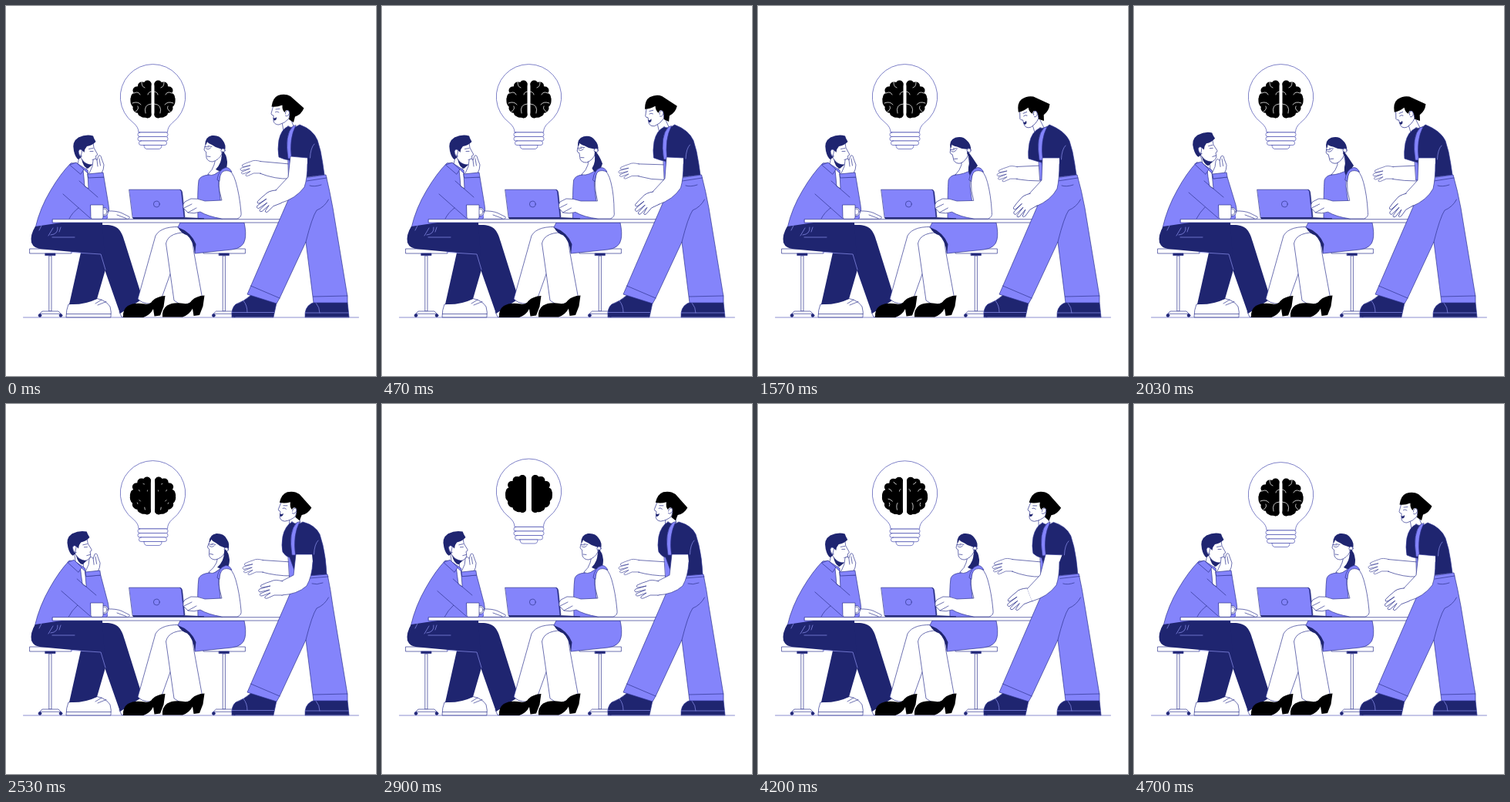
An HTML page for the animation above (4.8 s loop, 480 by 480 pixels).

```html
<!DOCTYPE html>
<html lang="en">
<head>
<meta charset="utf-8">
<title>Team idea</title>
<style>
html,body{margin:0;width:100%;height:100%;overflow:hidden;background:#fff}
svg{display:block;width:100vw;height:100vh}
svg *{stroke-linejoin:round;stroke-linecap:round}
.w{fill:#fff}.p{fill:#8484fb}.n{fill:#1f2570}.k{fill:#000}
.l{fill:none}
.pale{fill:none;stroke:#8f92f0}
.none{stroke:none}
.curl{fill:none;stroke:#fff;stroke-width:.75;stroke-linecap:butt}
</style>
</head>
<body>
<svg viewBox="0 0 480 480" stroke="#2f3490" stroke-width=".7">
<defs>
  <g id="stool">
    <rect class="w" x="31" y="315" width="54" height="6"/>
    <rect class="n" x="51" y="321" width="13" height="2.6"/>
    <rect class="w" x="56.2" y="324" width="2.8" height="72"/>
    <path class="w" d="M44 399L47 396H68L71 399Z"/>
    <circle class="n" cx="44" cy="401.4" r="2"/><circle class="n" cx="71" cy="401.4" r="2"/>
  </g>
  <path id="heel" class="k none" d="M152 404Q151 394 158 389Q166 384 180 386.500Q186 388 190 382.500Q196 376.500 206.500 376L204.500 390L200 401.500L192.500 402.500L191 393Q187 401 178 404Z"/>
  <g id="hand">
    <path class="w" d="M2-9Q-8-12-13-9Q-20-7-26-4Q-28-1-24-1L-14-3L-28 1Q-31 3-28 5L-15 2L-27 7Q-29 10-25 10L-14 6L-21 11Q-22 14-18 13L-9 9H2"/>
  </g>
  <g id="half">
    <path class="k none" d="M188.500 100V142Q186 147 181 144.500Q175 146 172 139Q165 139 165 131Q160 127 162 119Q162 114 166 113Q165 105 172 104Q173 98 180 99Q185 94 188.500 100Z"/>
    <g class="k none">
      <circle cx="183.500" cy="101.500" r="5"/><circle cx="176" cy="103.500" r="5"/><circle cx="169.500" cy="109.500" r="5"/>
      <circle cx="166.500" cy="120.500" r="5"/><circle cx="169.500" cy="132.500" r="5"/><circle cx="176" cy="138.500" r="5"/><circle cx="183.500" cy="140.500" r="5"/>
    </g>
    <g class="curl">
      <path pathLength="1" d="M180 106Q176 105 176 99"/>
      <path pathLength="1" d="M174 115Q172 110 166 113"/>
      <path pathLength="1" d="M184 115Q184 112 188.500 111"/>
      <path pathLength="1" d="M175 128Q171 123 164 126"/>
      <path pathLength="1" d="M171 130Q173 134 168 137"/>
      <path pathLength="1" d="M181 139Q178 128 188.500 127"/>
    </g>
  </g>
</defs>
<rect class="w none" width="480" height="480"/>
<path d="M22.500 404H457.500" stroke="#5c60bd"/>

<g id="bulb" stroke="#484db0">
  <path class="w" d="M172 163.500Q172 157 165 151.400A42.200 42.200 0 1 1 216 151.400Q209.500 157 209.500 163.500Z"/>
  <rect class="w" x="171" y="164" width="39" height="5.500" rx="2.500"/>
  <rect class="w" x="171" y="169.500" width="39" height="5.500" rx="2.500"/>
  <rect class="w" x="172.500" y="175" width="36" height="5.500" rx="2.500"/>
  <path class="w" d="M179 180.500H202Q202 185.500 198 185.500H183Q179 185.500 179 180.500Z"/>
  <use id="brainL" href="#half"/>
  <use id="brainR" href="#half"/>
</g>

<use href="#stool"/>
<use href="#stool" x="225.400"/>

<!-- seated man -->
<path class="w" d="M147 397L150 403.500H160L162 390Z"/>
<path class="n none" d="M118 284H132C146 285 150 292 154 306L175 373L174 382L148 399L121 322Z"/>
<path class="w" d="M78 403.500Q78 394 81 387Q100 386 118 379.500Q130 382 135 390Q137 397 136 403.500Z"/>
<path class="l" d="M78.500 399.500H136M116 386L124 381M119 388L130 383.500"/>
<path id="mNeck" class="w"/>
<path id="mTorso" class="p"/>
<path class="n none" d="M38 286L72 281L125 281L129 342L118 380Q102 388 82 387L97 320L48 315.500Q36 315 33 307Q31 297 38 286Z"/>
<path class="pale" d="M84 319.500L123 322L129 342M55 298L61 288M58 297Q68 296 67 287M71 287L69 293M60 300H89M43 291L46 285"/>
<path id="mTie" class="w"/>
<path id="mCollar" class="p"/>
<path id="mFold" class="l"/>
<g id="mHead">
  <path class="w" d="M101 179L113 177L114 184L118.500 192Q119 194 116.500 194.500L117 200Q115 206 109 206Q102 205 97 197Z"/>
  <path class="n none" d="M98 198Q102 206 112 206L106 211Q100 209 98 198Z"/>
  <path class="n none" d="M88 188Q85 176 94 170.500Q104 166 113 168.500Q114 172 116.500 176Q112 181 105 182Q102 185 101.500 190L99.500 188Q96 184 94 188Q94 194 98 196L94 199Q90 197 88 188Z"/>
  <path class="l" d="M99 187Q95 184 94 189Q95 195 98.500 195M107.500 185.500L113 184.500M109 188.500H113M112 199.500L116.500 198.500"/>
</g>
<g id="mHand">
  <path class="w" d="M108 217L112 208L113 200.500Q115 196 118 200L120 194.500Q123 192 124 198L127 206Q127 212 124 217"/>
  <path class="l" d="M118 200L119 208M121 198L122.500 207"/>
</g>
<path id="mCuff" class="p"/>
<path class="w" d="M132 266Q143 265.500 150 268.500L160 273.500Q161.500 276.500 156 276.300L132 276.300"/>
<path class="l" d="M144 271L156 275.500"/>

<!-- seated woman -->
<path class="w" d="M232 287Q202 284 194 298L171 380Q180 390 200 384L214 345L226 300Z"/>
<path class="w" d="M240 294Q211 292 207.500 308L218 382Q232 394 246 380L254.500 378L243.500 318Z"/>
<use href="#heel"/><use href="#heel" x="51" y="-.5"/>
<path class="p" d="M223 287L226 281H309Q312 295 310 303Q308 314 293 316L245 321Q246 305 238 297Z"/>
<path class="n none" d="M223 287Q240 293 246.500 309L245 321Q243 304 235 297.500Q227 295 223 287Z"/>
<path id="sNeck" class="w"/>
<path id="sDress" class="p"/>
<g id="sHead">
  <path class="w" d="M260 176L257 186Q257 188 259.500 189L260 197Q262 202 268 202Q276 200 280 192V176Z"/>
  <path class="n none" d="M258.500 180Q258 170 267 168Q277 167 281 174Q286 180 284 188Q281 190 279 185.500Q272 184 267 180Q262 178 261 176Q260 180 258.500 180Z"/>
  <circle class="w" cx="281.500" cy="187.500" r="2.600"/>
  <path class="l" d="M259 184.500Q262 187.500 265.500 184M262 181.500L267 182.500M261 195L265 195.500M258 182.500L263 183"/>
</g>
<path id="sTail" class="n none"/>

<!-- table -->
<rect class="w" x="60.500" y="276.700" width="300" height="4.300"/>
<path class="n" d="M226 238.200Q228 238.500 228.700 242L232 274H229Z"/>
<path class="p" d="M160 238.200H225Q227 238.500 227.500 241L231 274.500H164.500Z"/>
<circle class="l" cx="195.300" cy="257" r="3.900"/>
<path class="n none" d="M164 274.300H233L257 275.300V276.300H165Z"/>
<circle class="w" cx="127" cy="267" r="5.600"/><circle class="w" cx="127" cy="267" r="4"/>
<path class="w" d="M110 258H126V274Q126 276.300 124 276.300H112Q110 276.300 110 274Z"/>
<path id="sArm" class="w"/>
<path id="sStrap" class="p"/>
<path id="sFinger" class="l"/>

<!-- standing woman -->
<path class="n" d="M293 403.500Q292 392 298 387Q309 383 318 375L351 385L347 403.500Z"/>
<path class="pale" d="M293 397.500H347.500M308 382.500Q313 388 313 397.500"/>
<path class="n" d="M388 403.500Q387 391 396 386L400 384.500H443L445 403.500Z"/>
<path class="pale" d="M388.500 398H444.500M402 385Q407 391 407 398"/>
<path id="wFar" class="w"/>
<use id="wFarHand" href="#hand"/>
<path id="wBib" class="p"/>
<path id="wNeck" class="w"/>
<path id="wShirt" class="n"/>
<g id="wTrim">
  <path class="p" d="M372 156Q361 167 366 198H370.500Q367 172 376 155Z"/>
  <path class="pale" d="M400 179Q395 184 394.500 197"/>
</g>
<path id="wPants" class="p"/>
<path class="l" d="M317.500 363L355 379M398.500 377L443 376M389 306Q397 274 403 265Q413 261 418.500 251"/>
<path id="wBelt" class="l"/>
<g id="wHead">
  <path class="w" d="M347.500 127L344 139.500Q344 141.500 347 142L347 149Q348 154 354 154Q362 152 367 146L370 130Z"/>
  <path class="k none" d="M344.500 130.500Q346 119 353 116Q362 113 369 117L386.500 132.500Q383 141 375 143.500L373 151L367 147Q369 141 367 136Q363 133 361.500 138Q358 135 358.500 128.500Q351 131.500 344.500 130.500Z"/>
  <path class="w" d="M362.500 140Q362.500 135.500 365.500 135.500Q369 137 366.500 141.500Q364 144 362.500 142.500"/>
  <path class="n none" d="M346.500 145Q349 146.500 351 144Q351.500 148.500 347.500 148.500Z"/>
  <path class="l" d="M349.500 137.500Q351.500 136 354 138M350 134L355 133.500"/>
</g>
<path id="wNear" class="w"/>
<use id="wNearHand" href="#hand"/>
</svg>
<script>
const LOOP = 4800;
const el = {};
document.querySelectorAll('[id]').forEach(e => el[e.id] = e);
const curls = document.querySelectorAll('.curl path');

const lerp = (a, b, p) => a + (b - a) * p;
const ease = p => (1 - Math.cos(Math.PI * p)) / 2;
const set = (id, name, v) => el[id].setAttribute(name, v);

// eased value at t from [time, value] pairs
function key(t, ks) {
  let i = 0;
  while (i < ks.length - 1 && t >= ks[i + 1][0]) i++;
  const a = ks[i], b = ks[i + 1];
  return b ? lerp(a[1], b[1], ease((t - a[0]) / (b[0] - a[0]))) : a[1];
}

// blend two paths of equal structure
function blend(a, b, p) {
  const nums = b.match(/[\d.]+/g);
  let i = 0;
  return a.replace(/[\d.]+/g, n => lerp(+n, +nums[i++], p).toFixed(2));
}
// v runs from -1 (leaning in) through 0 (rest) to 1 (leaning back)
const pose = ([fore, rest, back], v) => v < 0 ? blend(rest, fore, -v) : blend(rest, back, v);
const mid = ([fore, rest, back], v) => v < 0 ? lerp(rest, fore, -v) : lerp(rest, back, v);

const man = {
  mNeck: ['M95 196L93 205L103 214L107 204', 'M86 193L89 204L99 213L98 201'],
  mTorso: ['M84 204Q71 217 58 239Q44 262 38 288L112 288L131 276Q135 270 133 258L127 222L107 222L106 213L92 204Z',
    'M81 203Q68 217 56 239Q43 262 37 288L112 288L131 276Q135 270 132 258L121 222L103 224L101 213L88 204Z'],
  mTie: ['M100 211L106 217L107 237L102 234L101 222Z', 'M95 211L101 217L103 237L98 234L96 222Z'],
  mCollar: ['M83 206L91 203L101 212L97 218Z', 'M79 205L87 202L97 212L93 218Z'],
  mFold: ['M95 227L119 248M74 244L109 275M94 262Q86 268 82 276', 'M91 227L116 248M71 242L109 275M92 261Q85 268 81 276'],
  mCuff: ['M106 218L126 216L127 222L107 223Z', 'M102 218L120 216L121 222L103 224Z']
};

const sitter = {
  sNeck: ['M264 198L264 206Q262 213 256 219L256 226L276 215L273 196', 'M272 198L270 206Q268 213 262 218L262 224L279 214L280 196',
    'M275 198L273 206Q270 213 263 218L263 224L279 213L284 196'],
  sDress: ['M256 219Q249 220 247 226Q246 240 246 276L281 276Q277 250 275 234Q274 222 278 212Q266 219 256 219Z',
    'M263 219Q252 220 250 226Q248 240 249 276L281 276Q278 250 276 234Q275 221 280 211Q270 222 263 219Z',
    'M264 219Q253 220 250 226Q248 240 249 276L281 276Q278 250 276 234Q275 221 280 211Q271 222 264 219Z'],
  sTail: ['M272 188Q278 196 285 207Q280 213 277 223Q272 217 273 209Q276 199 271 191Z',
    'M281 188Q286 192 287 202Q287 209 285 213Q278 216 272 212Q280 204 280 192Z',
    'M284 188Q289 192 290 202Q290 209 287 213Q280 215 274 212Q283 204 283 192Z']
};
const sitArm = ['M278 215Q275 228 277 240L279 254L258 253Q248 250 238 250L230 254Q228 258 229 262L233 268Q242 270 250 268Q262 275 280 276L292 276Q299 274 297 266Q299 245 296 230Q293 215 286 211Q281 210 278 215Z',
  'M279 214Q275 226 277 240L280 252L258 253Q248 249 240 250L232 254Q229 257 230 262L236 268Q244 270 252 267Q262 273 280 276L300 276Q306 274 305 268Q303 245 298 228Q294 214 286 211Q281 210 279 214Z'];
const strap = ['M273 226Q274 213 282 210Q288 209 291 215Q284 212 279 215Q276 219 276 228Z',
  'M274 225Q276 212 285 209.500Q290 209 293 215.500Q286 212 281 215Q277 219 277 227Z'];

const stander = {
  wBib: ['M364 197L378 197L378 226L366 226Z', 'M366 196L380 196L380 226L367 226Z', 'M366 194L384 194L384 226L368 226Z'],
  wNeck: ['M356 154L359 164L372 160L366 148', 'M358 150L360 162L374 158L369 146', 'M368 148L367 160L382 156L380 143'],
  wShirt: ['M366 158Q355 163 352 178Q350 190 351 198Q360 201 368 203L371 224L413 219Q411 204 408 189L404 175Q398 162 378 154Q372 160 366 158Z',
    'M366 156Q357 160 354 174Q352 186 354 196Q360 199 368 200L371 224L413 219Q411 203 408 188L404 174Q398 160 381 154Q372 160 366 156Z',
    'M371 153Q362 158 359 172Q357 184 359 192Q363 198 368 199L377 224L416 221Q415 200 411 183L407 169Q401 157 385 153Q378 158 371 153Z'],
  wPants: ['M371 225L414 219Q420 240 424 262L443 377L443 385L399 385L389 306L355 379L351 386L313 374Q345 300 371 240Z',
    'M372 225L415 219Q420 240 424 262L443 377L443 385L399 385L389 306L355 379L351 386L313 374Q345 300 372 238Z',
    'M370 225L417 221Q421 240 424 262L443 377L443 385L399 385L389 306L355 379L351 386L313 374Q345 300 372 238Z'],
  wBelt: ['M389 227L415 223M394 233Q400 235 409 232', 'M390 227L416 223M394 233Q400 235 409 232', 'M393 226L418 224M397 233Q403 235 411 232']
};
const shoulder = ['M391 197L369 197', 'M391 197L369 195', 'M397 195L376 195'];
const nearArm = ['L368 226L351.500 244L360.500 260Q380 252 388 237Q391 224 391 205', 'L366 222L349 240L355 256Q376 250 387 235Q391 224 391 205',
  'L373 222L357 230L357 248Q378 247 390 236Q397 224 398 205'];
const farArm = ['M368 207L335 208.500L335 224.500Q350 227 367 227', 'M368 205L329 201.500L329 217Q350 225 367 224',
  'M370 205L332 202.500L332 218Q350 223 370 223'];

function drawMan(t) {
  const m = key(t, [[0, 0], [1630, 0], [2060, 1], [2500, .7], [3230, .7], [3800, .45], [4270, 0]]);
  for (const id in man) set(id, 'd', blend(man[id][0], man[id][1], m));
  set('mHead', 'transform', `translate(${-10 * m} ${-3.5 * m}) rotate(${-3 * m} 100 205)`);
  set('mHand', 'transform', `translate(${-7 * m} ${m * .5})`);
}

function drawSitter(t) {
  const s = key(t, [[0, 0], [30, 0], [930, -1], [2080, -1], [2520, 1], [2900, 0]]);
  const a = key(t, [[0, 0], [30, 0], [930, -1], [1100, -1], [1600, -.2], [2080, -.2], [2500, 0]]);
  for (const id in sitter) set(id, 'd', pose(sitter[id], s));
  set('sHead', 'transform', `translate(${mid([-5, 0, 3], s)} ${mid([2, 0, 0], s)}) rotate(${mid([-10, 0, 5], s)} 268 203)`);
  set('sArm', 'd', blend(sitArm[1], sitArm[0], -a));
  set('sStrap', 'd', blend(strap[1], strap[0], -a));
  set('sFinger', 'd', blend('M231 262L241 257M236 268L247 262', 'M229 262L239 257M233 268L244 262', -a));
}

function drawStander(t) {
  const u = key(t, [[0, 0], [30, 0], [930, -1], [2080, -1], [2520, 1], [3830, 1], [4670, 0]]);
  const a = key(t, [[0, 0], [30, 0], [930, -1], [2080, -1], [2520, 1], [3230, 1], [3800, 0]]);
  const r = key(t, [[0, 0], [30, 0], [930, -17], [2080, -17], [2520, 6.5], [3230, 6.5], [3800, 12], [4670, 0]]);
  const lag = Math.max(u - a, 0) * 3;
  for (const id in stander) set(id, 'd', pose(stander[id], u));
  set('wTrim', 'transform', `translate(${mid([-1, 0, 5], u)} ${mid([2, 0, -2], u)})`);
  set('wHead', 'transform', `translate(${mid([-2, 0, 8], u)} ${mid([0, 0, -.5], u)}) rotate(${r} 366 150)`);
  set('wNear', 'd', pose(shoulder, u) + pose(nearArm, a));
  set('wNearHand', 'transform', `translate(${mid([356, 352, 357], a) - lag} ${mid([252, 248, 239], a)}) rotate(${mid([-30, -21, 0], a)})`);
  set('wFar', 'd', pose(farArm, a));
  set('wFarHand', 'transform', `translate(${mid([335, 329, 332], a)} ${mid([216.5, 209.3, 210.3], a)}) scale(.85)`);
}

function drawBulb(t) {
  const up = key(t, [[0, 0], [2000, 0], [3350, 1], [4700, 0]]);
  const line = key(t, [[0, 1], [2000, 1], [2720, 0], [3650, 0], [4700, 1]]);
  const gap = 1.6 * Math.min(1, up * 1.2);
  set('bulb', 'transform', `translate(0 ${-6 * up})`);
  set('brainL', 'transform', `translate(${-gap} 0)`);
  set('brainR', 'transform', `matrix(-1 0 0 1 ${381 + gap} 0)`);
  curls.forEach(c => {
    c.style.strokeDasharray = line > .999 ? 'none' : `${line} 2`;
    c.style.opacity = line < .005 ? 0 : 1;
  });
}

function draw() {
  const t = performance.now() % LOOP;
  drawMan(t);
  drawSitter(t);
  drawStander(t);
  drawBulb(t);
  requestAnimationFrame(draw);
}
draw();
</script>
</body>
</html>
```
